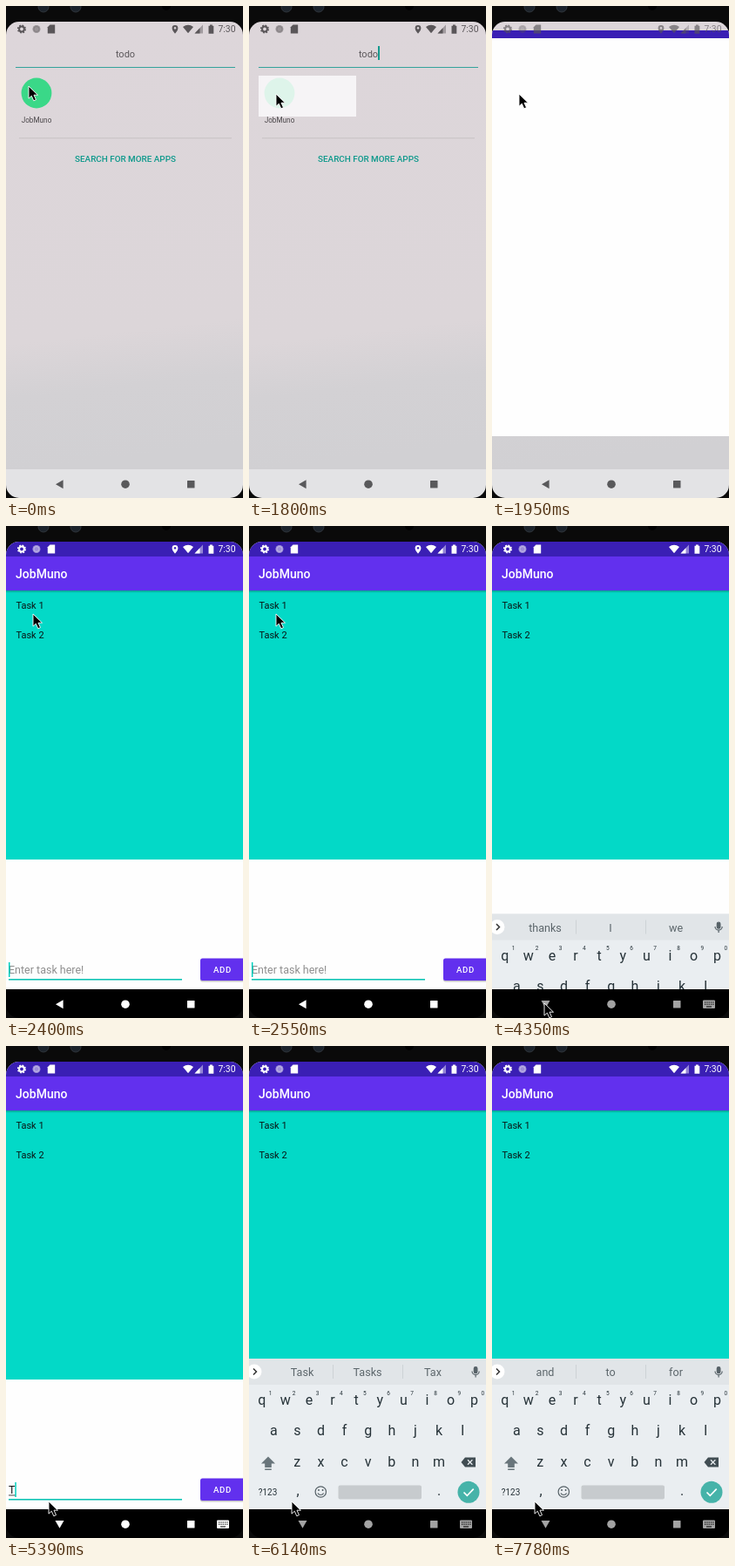
An HTML page for the animation above (8000 ms loop, 272 by 565 pixels).

```html
<!DOCTYPE html>
<html lang="en">
<head>
<meta charset="utf-8">
<title>Task list on a phone</title>
<style>
html, body { margin: 0; width: 100%; height: 100%; overflow: hidden; background: #0a0a0a; }
svg { display: block; width: 100%; height: 100%; }
text { font-family: Roboto, Arial, sans-serif; }
.mid { text-anchor: middle; }
.med { font-weight: 500; }
</style>
</head>
<body>
<svg viewBox="0 0 272 565" preserveAspectRatio="none">
  <defs>
    <linearGradient id="wall" x1="0" y1="0" x2=".06" y2="1">
      <stop offset="0" stop-color="#ddd6da"/>
      <stop offset=".72" stop-color="#dcd6d9"/>
      <stop offset=".84" stop-color="#d3d1d4"/>
      <stop offset="1" stop-color="#d1d0d3"/>
    </linearGradient>
    <linearGradient id="shade" x1="0" y1="0" x2="0" y2="1">
      <stop offset="0" stop-opacity=".28"/>
      <stop offset="1" stop-opacity="0"/>
    </linearGradient>
    <clipPath id="screen"><rect y="18" width="272" height="547" rx="15"/></clipPath>
    <clipPath id="window"><rect id="windowBox" y="18" width="272" height="514"/></clipPath>
    <clipPath id="aboveNav"><rect y="340" width="272" height="192"/></clipPath>
  </defs>

  <rect width="272" height="565" fill="#0a0a0a"/>
  <g fill="#1c232b" stroke="#30363c">
    <circle cx="43" cy="1" r="6"/><circle cx="80" cy="1" r="6"/>
    <circle cx="184" cy="0" r="5" fill="#000" stroke="none"/>
  </g>

  <g clip-path="url(#screen)">
    <g id="home">
      <rect y="18" width="272" height="514" fill="url(#wall)"/>
      <text class="mid" x="137" y="59" font-size="11" fill="#5b575a">todo</text>
      <rect x="11" y="70" width="252" height="1" fill="#33a39b"/>
      <rect id="searchCaret" x="148" y="46" width="2" height="16" fill="#159a8e"/>
      <circle cx="35" cy="100" r="17.4" fill="#3ad888"/>
      <rect id="press" x="11" y="80" width="112" height="47" fill="#fbfafc"/>
      <text class="mid" x="35" y="134" font-size="8.2" fill="#4d494c">JobMuno</text>
      <rect x="15" y="151.3" width="244" height="1" fill="#c6c0c4"/>
      <text class="mid med" x="137" y="178.5" font-size="9.9" fill="#0d998b">SEARCH FOR MORE APPS</text>
    </g>

    <g id="app" clip-path="url(#window)">
      <rect y="18" width="272" height="514" fill="#fefefe"/>
      <rect id="statusBar" y="18" width="272" height="17" fill="#3a1fb4"/>
      <g id="content">
        <rect y="74" width="272" height="309" fill="#03d9c7"/>
        <rect y="74" width="272" height="3" fill="url(#shade)"/>
        <rect y="35" width="272" height="39" fill="#6230ee"/>
        <text class="med" x="11" y="60" font-size="14" fill="#fff">JobMuno</text>
        <g font-size="11" fill="#0a1414">
          <text x="11.5" y="95">Task 1</text>
          <text x="11.5" y="128.5">Task 2</text>
        </g>
        <text id="hint" x="3" y="514" font-size="12.5" fill="#8e8e8e">Enter task here!</text>
        <g id="typed">
          <text x="3" y="514" font-size="12.5" fill="#151515">T</text>
          <rect x="3" y="515.5" width="8" height=".9" fill="#333"/>
        </g>
        <rect x="3" y="520" width="199" height="1.6" fill="#10c4b5"/>
        <rect id="inputCaret" y="501" width="1.5" height="17" fill="#03d0be"/>
        <rect x="223" y="498" width="60" height="25.5" rx="2.5" fill="#000" opacity=".22"/>
        <rect x="223" y="496.5" width="60" height="25.5" rx="2.5" fill="#6230ee"/>
        <text class="med" x="238" y="513" font-size="9.6" letter-spacing=".7" fill="#fff">ADD</text>
      </g>
    </g>

    <g clip-path="url(#aboveNav)">
      <g id="keyboard">
        <rect y="359" width="272" height="173" fill="#eaeef1"/>
        <rect y="359" width="272" height="30" fill="#e1e5e8"/>
        <circle cx="6" cy="374" r="8.5" fill="#fff"/>
        <path d="M5 370.5l3.5 3.5-3.5 3.5" fill="none" stroke="#333" stroke-width="1.5"/>
        <path d="M96.5 366v16M176.5 366v16" stroke="#cdd2d5"/>
        <g id="words" class="mid" font-size="12.6" fill="#5c666b">
          <text x="61" y="379"/><text x="136" y="379"/><text x="211" y="379"/>
        </g>
        <g fill="none" stroke="#566167" stroke-width="1.2">
          <rect x="258.3" y="368.5" width="3.6" height="7.2" rx="1.8" fill="#566167"/>
          <path d="M256 373.5a4.1 4.1 0 0 0 8.2 0M260.1 377.6v3"/>
        </g>
        <g id="keys" class="mid" fill="#263238"></g>
        <path d="M22 471.5l8 8h-4.2v4.5h-7.6v-4.5H14zM18.2 485.5h7.6v1.5h-7.6z" fill="#69757b"/>
        <path d="M243.500 478l4.500-5.500h12v11h-12z" fill="#414d53"/>
        <path d="M251 475.300l5.400 5.400m0-5.400l-5.400 5.400" stroke="#eaeef1" stroke-width="1.3"/>
        <g fill="none" stroke="#566167" stroke-width="1.2">
          <circle cx="82.300" cy="512" r="6.200"/>
          <path d="M79 513.500a3.500 3 0 0 0 6.600 0"/>
          <path d="M80 509v2m4.600-2v2" stroke-width="1.5"/>
        </g>
        <rect x="102.500" y="504.500" width="95.500" height="16" rx="2" fill="#c7cbce"/>
        <circle cx="252" cy="512.300" r="12.500" fill="#46b3a9"/>
        <path d="M246.500 512.500l3.800 3.800 7.400-7.600" fill="none" stroke="#fff" stroke-width="1.700"/>
      </g>
    </g>

    <g id="status">
      <g fill="none" stroke="currentColor">
        <circle cx="18" cy="26.500" r="2.900" stroke-width="2"/>
        <circle cx="18" cy="26.500" r="4.300" stroke-width="1.600" stroke-dasharray="1.800 1.577"/>
      </g>
      <circle cx="35" cy="26.500" r="4.500" fill="currentColor" opacity=".5"/>
      <circle cx="35" cy="26.500" r="3" fill="none" stroke="currentColor" stroke-width=".8" opacity=".4"/>
      <g fill="currentColor">
        <path d="M50.500 21.500h5.700v10h-8.400v-7.300z"/>
        <path id="pin" fill-rule="evenodd" d="M194 31.800c-2-2.600-3.400-4.600-3.400-6.400a3.400 3.400 0 0 1 6.800 0c0 1.800-1.400 3.800-3.400 6.400zM194 24a1.300 1.300 0 1 0 .01 0z"/>
        <path d="M203 24q6-4.600 12 0l-6 7.300z"/>
        <path d="M226 21.500v10h-9.500z" opacity=".45"/>
        <path d="M222.500 25.200v6.300h-6z"/>
        <path d="M234 21.500h2.800v1.200h1.500v9h-5.800v-9h1.500z"/>
        <text x="243.500" y="30.200" font-size="10.400">7:30</text>
      </g>
    </g>

    <rect id="navBar" y="532" width="272" height="33"/>
    <g id="nav" fill="currentColor">
      <path id="back" d="M57 549.200l8.600-5v10z"/>
      <path id="down" d="M56.500 545h10l-5 8.800z"/>
      <circle cx="137" cy="549.200" r="4.800"/>
      <rect x="208" y="545" width="8.500" height="8.500" rx=".5"/>
      <g id="keyIcon">
        <rect x="242" y="544.500" width="14" height="9.500" rx="1"/>
        <path d="M244 547h10.500M244 549.300h10.500" stroke="#000" stroke-width="1.100" stroke-dasharray="1.300 1"/>
        <path d="M246 552h6" stroke="#000" stroke-width="1.100"/>
      </g>
    </g>
  </g>

  <path id="mouse" d="M0 0v14.200l3.300-3 2.500 5.600 2.700-1.200-2.500-5.400h4.500z" stroke="#fff" stroke-width=".9"/>
</svg>

<script>
const LOOP = 8000;
const $ = id => document.getElementById(id);
const show = (id, on) => $(id).setAttribute('visibility', on ? 'inherit' : 'hidden');
const set = (id, attrs) => {
  for (const name in attrs) $(id).setAttribute(name, attrs[name]);
};

function addKey(label, x, y, size = 16) {
  const key = document.createElementNS('http://www.w3.org/2000/svg', 'text');
  key.textContent = label;
  key.setAttribute('x', x);
  key.setAttribute('y', y);
  key.setAttribute('font-size', size);
  $('keys').append(key);
}

const ROWS = [['qwertyuiop', 14.7, 412], ['asdfghjkl', 28.3, 447], ['zxcvbnm', 55.3, 483]];
for (const [letters, x, y] of ROWS) {
  [...letters].forEach((letter, i) => addKey(letter, x + 27.1 * i, y));
}
for (let i = 0; i < 10; i++) addKey((i + 1) % 10, 24.5 + 27.1 * i, 400.5, 6.5);
addKey('?123', 21.5, 516, 10);
addKey(',', 56, 516);
addKey('.', 218, 516);

// Time, x, y
const MOUSE = [
  [900, 26, 92], [1350, 31, 101], [2700, 31, 101], [2850, 31, 177], [3000, 24, 530],
  [3300, 30, 526], [3750, 53, 517], [3900, 53, 517], [4200, 60, 548], [4350, 60, 548],
  [4800, 49, 523]
];
// Time, downward shift
const KEYBOARD = [
  [2700, 173], [3000, 0], [4200, 0], [4500, 173], [5390, 173], [5690, 0]
];
const WORDS = [
  [0, ''], [3300, 'thanks I we'], [5540, 'The I This'],
  [6140, 'Task Tasks Tax'], [6430, 'and to for']
];

function along(points, t) {
  if (t <= points[0][0]) return points[0].slice(1);
  for (let i = 1; i < points.length; i++) {
    const a = points[i - 1], b = points[i];
    if (t <= b[0]) {
      const k = (t - a[0]) / (b[0] - a[0]);
      return a.slice(1).map((v, j) => v + (b[j + 1] - v) * k);
    }
  }
  return points[points.length - 1].slice(1);
}

const step = t => t < 4940
  ? Math.floor(t / 150) * 150
  : 4940 + Math.floor((t - 4940) / 150) * 150;

function draw(now) {
  const t = step(now);
  const launched = t >= 1950, opening = t === 1950, inApp = t >= 2100;

  show('home', t < 2100);
  show('searchCaret', (t >= 300 && t < 900) || t >= 1350);
  $('press').setAttribute('opacity', Math.min(.85, Math.max(0, (t - 1350) / 450)));

  show('app', launched);
  show('content', t >= 2400);
  set('windowBox', opening ? { y: 28, height: 466 } : { y: 18, height: 514 });
  set('statusBar', { height: opening ? 19 : 17 });

  const hasText = t >= 5390;
  show('hint', !hasText);
  show('typed', hasText);
  set('inputCaret', { x: hasText ? 10.3 : 3 });
  show('inputCaret', t >= 2400 && (hasText || Math.floor((t - 2400) / 500) % 2 === 0));

  const [shift] = along(KEYBOARD, t);
  show('keyboard', shift < 173);
  set('keyboard', { transform: `translate(0 ${shift})` });
  const words = WORDS.filter(w => w[0] <= now).pop()[1].split(' ');
  [...$('words').children].forEach((el, i) => { el.textContent = words[i] || ''; });

  set('status', { color: inApp ? '#fff' : '#5a5659', opacity: opening ? .65 : 1 });
  show('pin', t < 2700);
  set('navBar', { fill: inApp ? '#000' : '#e3e3e5' });
  set('nav', { color: inApp ? '#fff' : '#59595b' });
  const dark = shift < 173;
  const keysOpen = dark || hasText;
  show('back', !keysOpen);
  show('down', keysOpen);
  show('keyIcon', hasText || (t >= 3300 && keysOpen));
  if (dark) set('nav', { color: '#a3a3a3' });

  set('mouse', { transform: `translate(${along(MOUSE, t)})` });
}

const start = performance.now();
function tick() {
  draw((performance.now() - start) % LOOP);
  requestAnimationFrame(tick);
}
tick();
</script>
</body>
</html>
```
